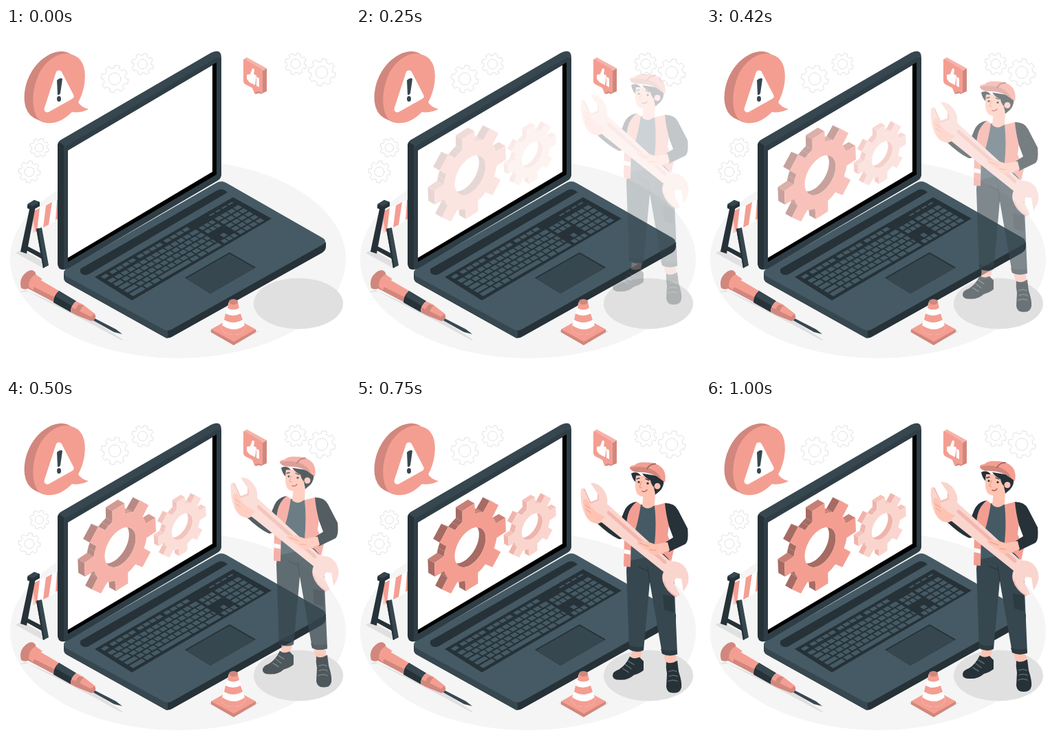
An HTML page for the animation above (1.04 s loop, 500 px wide and 500 px high).

```html
<!DOCTYPE html>
<html lang="en">
<head>
<meta charset="utf-8">
<title>Laptop repair</title>
<style>
html, body { margin: 0; height: 100%; overflow: hidden; background: #fff; }
svg { display: block; width: 100%; height: 100%; }
.pink { fill: #f49e92; } .rose { fill: #d1877d; } .pale { fill: #fad5ce; } .skin { fill: #ffc3b2; }
.ink { fill: #263238; } .slate { fill: #37474f; } .steel { fill: #455a64; }
.white { fill: #fff; } .shade { fill: #e0e0e0; }
.line { fill: none; stroke-linecap: round; stroke-linejoin: round; }
</style>
</head>
<body>
<svg viewBox="0 0 500 500">
  <ellipse cx="250" cy="336" rx="244" ry="144" fill="#f5f5f5"/>
  <ellipse class="shade" cx="425" cy="400.500" rx="65" ry="37"/>
  <g id="cogs" class="line" stroke="#e2e2e2"/>

  <!-- barrier -->
  <path class="shade" d="M14 327l9-5 37 21-6 6z"/>
  <path class="white" d="M35 268l41-19v29l-35 20z"/>
  <path class="pink" d="M35 268l14-6-4 33-5 3zM58 258l9-5-5 33-8 4zM74 250l2-1v28l-4 2z"/>
  <path class="pale" d="M35 268l2-1 6 30-3 1z"/>
  <path class="ink" d="M35 259h8l-13 69-9-3zM27 315l27 14-1 7-27-15z"/>
  <path class="slate" d="M44 292l8-2 10 55-8 4z"/>
  <path class="ink" d="M44 292l3-1 9 57-2 1z"/>
  <path class="ink" d="M31 257l10-7 8 3v6l-11 6-7-3z"/>
  <path class="slate" d="M31 256l10-6 8 3-10 6z"/>

  <!-- laptop -->
  <path class="ink" d="M84 356v7q0 5 6 8l140 78q5 3 11 0l218-122q6-4 6-9v-7L235 438z"/>
  <path class="slate" d="M84 356v7q0 5 6 8l140 78q3 2 5 2v-13z"/>
  <path class="steel" d="M88 350l218-125q7-4 14 0l140 80q8 5 0 10L241 438q-6 3-12 0L88 361q-8-6 0-11z"/>
  <path class="ink" d="M108 350l199-114q8-4 15 3L120 358q-8 3-12-3z"/>
  <path class="ink" d="M129 362l201-116 56 31-203 119z"/>
  <g id="keys" class="steel" transform="matrix(1.005 -.58 .55 .33 129 362)"/>
  <path class="ink" d="M260 363l65-37 38 22-66 38z"/>
  <path class="slate" d="M262 364l63-36 36 21-64 37z"/>
  <path class="slate" d="M75 171q0-5 4-8L298 36q15-7 15 7v169q0 7-6 10L91 349q-16 7-16-8z"/>
  <path class="ink" d="M75 171q0-3 2-5l8 5q-1 3-1 6v174q-9 0-9-10z"/>
  <path d="M84 179q0-5 4-8L303 45q8-4 10 0v167q0 7-6 10L91 349q-4 2-7 2z" fill="#2f3e46"/>
  <path d="M90 178L306 50v163L90 340z"/>
  <path class="white" d="M90 178L300 54v155L90 334z"/>

  <!-- screwdriver -->
  <path class="shade" d="M18 384l10-3 98 43 44 29-2 1-46-25-90-46z"/>
  <path class="slate" d="M127 421l33 17 9 7-12-3-32-18z"/>
  <path class="pink" d="M36 358l41 24-8 16-38-20z"/>
  <path class="rose" d="M34 373l38 19-3 6-38-20z"/>
  <path class="rose" d="M22 378q-4-15 9-24 8-5 12 2 2 8-6 18-7 9-15 4z"/>
  <path class="pink" d="M33 376q0-13 10-18l10 7q-11 5-14 16z"/>
  <path class="ink" d="M77 382l25 15q-8 6-8 16l-25-14q0-10 8-17z"/>
  <path class="slate" d="M77 382l25 15q-5 3-6 7l-24-14q2-5 5-8z"/>
  <path class="pink" d="M102 397q-8 6-8 16l10 5 20 7 6-9-18-14z"/>
  <path class="rose" d="M95 406l11 5 20 10-2 5-20-8-10-5z"/>
  <path class="rose" d="M106 402q-7 6-6 14l6 2q0-8 7-15zM128 416q4 2 1 7-3 4-6 2-2-4 5-9z"/>

  <!-- cone -->
  <path class="shade" d="M295 441l36-20 36 20-36 20z"/>
  <path class="rose" d="M298 438v4l33 19 32-19v-4z"/>
  <path class="pink" d="M298 438l32-18 33 18-32 18z"/>
  <path class="rose" d="M298 438v4l33 19v-5z"/>
  <path class="white" d="M324 398l-11 38q3 10 18 10 14 0 17-10l-11-38z"/>
  <path class="pink" d="M324 398l-2 9q8 5 17 0l-2-9zM319 415l-2 9q13 8 27 0l-3-9q-11 6-22 0zM314 432l-1 4q3 10 18 10 14 0 17-10l-1-4q-15 12-33 0z"/>
  <ellipse class="rose" cx="330.500" cy="398" rx="6.500" ry="4"/>

  <!-- warning bubble -->
  <path class="rose" d="M94 38Q82 30 64 38C38 51 24 82 27 108q2 16 14 23l13 6z"/>
  <path class="pink" d="M94 38C78 33 55 48 46 71c-8 20-9 42-2 57 6 11 20 13 34 7q9-4 18-13 12 2 24-4-11-3-15-10c10-18 13-42 6-57q-5-10-17-13z"/>
  <path class="white" d="M77 66L60 118l34-19z" stroke="#fff" stroke-width="9" stroke-linejoin="round"/>
  <path class="slate" d="M74 76q5-5 8-2l-3 21q-2 3-4 2z"/>
  <ellipse class="slate" cx="77" cy="103" rx="3" ry="4"/>

  <!-- like badge -->
  <path class="rose" d="M345 46l5-3 29 16v33l-9 4-8-6z"/>
  <path d="M345 46l5-3 29 16-7 4z" fill="#f7b3a9"/>
  <path class="pink" d="M345 47q0-2 3-1l22 13q3 2 3 5v28q0 3-3 2l-4-2-5 3-3-8-10-5q-3-2-3-5z"/>
  <path class="rose" d="M361 95l5-3 4 2-7 2z"/>
  <path class="white" d="M350 68l5-1 3-8q3-1 3 3l-1 5 4 2-2 14-8-4-4-5zM364 71l4 2v13l-4-2z"/>

  <g id="gears"/>

  <g id="man">
    <path class="skin" d="M401 356l16 4-4 15-13-2zM447 368l18 2 1 12-15 1z"/>
    <path class="ink" d="M398 371q6 5 14 1l6 6v13q-6 5-14 7-9 8-21 7-10 0-10-6 0-6 9-9 10-6 16-19z"/>
    <path class="ink" d="M451 379q6 4 16-2l2 16q5 15 4 23-2 9-12 8-9 0-10-9l1-19q-2-9-1-17z"/>
    <path class="line" d="M388 389l8 5m-4-11l8 6m-4-11l8 5m51 10q6-3 11 0m-11 7q6-3 12 0m-13 7q7-3 13 0" stroke="#596b73" stroke-width="1.500"/>
    <path class="slate" d="M396 218l54 4q10 14 12 30l5 115q-11 5-22 0l-18-104-9 99q-10 5-21-1l-4-116z"/>
    <path class="line" d="M427 263l-3-21m-13-1l13 6" stroke="#263238"/>
    <path d="M446 281l16 3v23l-14-4zM397 354q10 6 21 2v5q-10 4-21-1zM443 360q12 5 23 1l1 7q-12 4-22-1z" fill="#2c3a42"/>
    <path class="steel" d="M411 150l25 2 9 70-48 10 2-30z"/>
    <path class="skin" d="M418 133h17l-1 18q-10 9-18 1z"/>
    <path class="ink" d="M408 146q-14 2-19 16l-9 22-21-17-9 10q18 17 31 23 5 2 9-4l13-29z"/>
    <path class="pink" d="M408 146l6 4q-5 34-14 53l-1 38-10-1 1-42q2-18 5-32 3-12 13-20zM434 152l15-4q8 3 8 14l-4 33 9 21-4 17-24-25q3-30 0-56z"/>
    <path class="white" d="M390 215l9 2v6l-10-2zM452 204l7 1 2 7-10-2z"/>

    <!-- head -->
    <path class="ink" d="M400 105q8-4 14 3l-6 11q-6-4-8-14z"/>
    <path class="skin" d="M407 108h32q3 22-14 30-9 3-15-2-6-6-3-28z"/>
    <path class="ink" d="M416 105l31 5q2 13-5 20l-7 6-2-11q-4-4-5-10-7-3-12-10z"/>
    <circle class="skin" cx="438" cy="123.500" r="4.500"/>
    <path class="pink" d="M398 97q-1-3 7-4 5-5 18-4c18 0 30 10 26 29l-12-9q-11-6-27-6-9 0-12-6z"/>
    <path class="rose" d="M398 97q13-4 29 1 13 5 17 16-15-12-34-11-10 0-12-6z"/>
    <path class="line" d="M423 98q4-7 12-7" stroke="#a66b63" stroke-width="2"/>
    <path class="line" d="M408 113l4-1m9 1l5 2" stroke="#263238" stroke-width="1.300"/>
    <path class="line" d="M415 117l-3 8 3 1" stroke="#e78b7c"/>
    <path class="line" d="M416 131q4 2 7-2" stroke="#b95c55" stroke-width="1.500"/>
    <circle class="ink" cx="411" cy="117.500" r="1.500"/><circle class="ink" cx="424" cy="119.500" r="1.600"/>

    <!-- wrench -->
    <path class="pale" d="M341 119q11-1 19 10 7 10 5 20l92 84q17-1 24 13 5 12 0 22l-5 9-3-19-8-1-3 7 9 18-6 3q-15-9-19-23-2-8 1-14l-90-72q-13 5-21-6-11-15-9-42l4-2 10 20 10-4v-8z"/>
    <path class="line" d="M367 162l82 72" stroke="#f3b7ad" stroke-width="5"/>
    <path class="line" d="M332 128l9 20 11-4v-8M465 284q-15-9-17-22" stroke="#f3b7ad" stroke-width="1.500"/>
    <path class="skin" d="M330 146q3-7 7-2l5 10 9 8 11 6-9 10q-13-1-19-12z"/>
    <path class="line" d="M333 151l7 5m-6 1l7 5" stroke="#ec9685"/>
    <path class="ink" d="M449 148q14 0 19 10l14 27q2 20-4 23l-23 11-5-14 11-7-6-16q-5-20-6-34z"/>
    <path class="skin" d="M453 205l3 12-18 6q-10 1-13-5l-15-10q-4-3 0-5l13 1 12 4z"/>
    <path class="line" d="M412 206l13 5m2 5l9 1" stroke="#ec9685"/>
  </g>
</svg>
<script>
const $ = id => document.getElementById(id);
const poly = (pts, fill) => `<path fill="${fill}" d="M${pts.map(p => p.join(' ')).join('L')}Z"/>`;

// Outline of an eight-toothed wheel of radius r, going clockwise
function wheel(r, turn, root = 0.75) {
  const pts = [];
  for (let k = 0; k < 8; k++)
    for (const [da, f] of [[-0.24, root], [-0.17, 1], [0.17, 1], [0.24, root], [0.39, root]]) {
      const a = turn + k * Math.PI / 4 + da;
      pts.push([r * f * Math.cos(a), r * f * Math.sin(a)]);
    }
  return pts;
}

const flatCog = (x, y, r, turn) => `<g transform="translate(${x} ${y})">
  ${poly(wheel(r, turn, 0.79), 'none')}<circle r="${r * 0.44}"/></g>`;

// Solid gear lying in the plane of the screen
function gear(cx, cy, r, [face, top, side]) {
  const at = ([x, y]) => [cx + 0.866 * x, cy - 0.5 * x + y];
  const dx = -r * 0.16, dy = -r * 0.09;
  const shift = ([x, y]) => [x + dx, y + dy];
  const pts = wheel(r, -0.05).map(at);
  const hole = Array.from({length: 48}, (_, i) => at([r * 0.43 * Math.cos(i * Math.PI / 24), r * 0.43 * Math.sin(i * Math.PI / 24)]));
  let out = '';
  pts.forEach((p, i) => {
    const q = pts[(i + 1) % pts.length], ex = q[0] - p[0], ey = q[1] - p[1];
    if (ey * dx - ex * dy > 0)
      out += poly([p, q, shift(q), shift(p)], Math.abs(ey) > Math.abs(ex) ? side : top);
  });
  const ring = [pts, hole].map(s => 'M' + s.map(p => p.join(' ')).join('L') + 'Z').join('');
  return out + poly(hole, side) + poly(hole.map(shift), '#fff') +
    `<path fill="${face}" fill-rule="evenodd" d="${ring}"/>`;
}

function keyboard() {
  let out = '';
  const key = (x, y, w, h = 10.5) => out += `<rect x="${x}" y="${y}" width="${w}" height="${h}"/>`;
  for (let i = 0; i < 13; i++) key(5 + i * 9 + Math.ceil(i / 4) * 3, 7, 7.4, 9);
  for (let i = 0; i < 4; i++) key(160 + i * 9, 9, 6.5, 4);
  for (let row = 0; row < 5; row++) {
    const y = 24 + row * 14.5, lead = 8 + row * 2.5;
    key(5, y, lead);
    if (row < 4) {
      for (let i = 0; i < 12; i++) key(7 + lead + i * 9, y, 7.4);
      key(115 + lead, y, 18 - lead);
    } else {
      for (const [x, w] of [[25, 9], [36, 9], [47, 43], [92, 9], [103, 9], [114, 19]]) key(x, y, w);
    }
    for (let i = 0; i < 3; i++)
      if (row < 2 || row > 3 || row === 3 && i === 1) key(137 + i * 7, y, 5.6);
    for (let i = 0; i < 4; i++) key(160 + i * 9, y, 7.4);
  }
  return out;
}

$('cogs').innerHTML = [[158, 74, 20, 0.2], [198.5, 52.5, 16, 0.3], [48.5, 174, 14, 0.3], [34, 209, 16, 0.1],
  [421, 52, 16, 0.3], [459, 64.500, 20, 0.2]].map(c => flatCog(...c)).join('');
$('keys').innerHTML = keyboard();
$('gears').innerHTML = gear(256, 184, 40.5, ['#fad5ce', '#f5c3bb', '#efb4ab']) +
  gear(166, 214, 60.5, ['#f49e92', '#c77f75', '#a66b63']);

// Cubic Bézier easing (.36, -.01, .5, 1.38): overshoots before settling
const bez = (s, a, b) => 3 * (1 - s) ** 2 * s * a + 3 * (1 - s) * s * s * b + s ** 3;
function ease(t) {
  if (t >= 1) return 1;
  let lo = 0, hi = 1;
  for (let i = 0; i < 24; i++) {
    const mid = (lo + hi) / 2;
    if (bez(mid, 0.36, 0.5) < t) lo = mid; else hi = mid;
  }
  return bez(lo, -0.01, 1.38);
}

const LOOP = 1040, start = performance.now();
function draw() {
  const ms = (performance.now() - start) % LOOP;
  const p = ms < 80 ? 0 : ease((ms + 20) / 1000);
  const alpha = Math.max(0, Math.min(1, p));
  $('gears').setAttribute('opacity', alpha);
  $('man').setAttribute('opacity', alpha);
  $('man').setAttribute('transform', `translate(0 ${30 * (p - 1)})`);
  requestAnimationFrame(draw);
}
draw();
</script>
</body>
</html>
```
